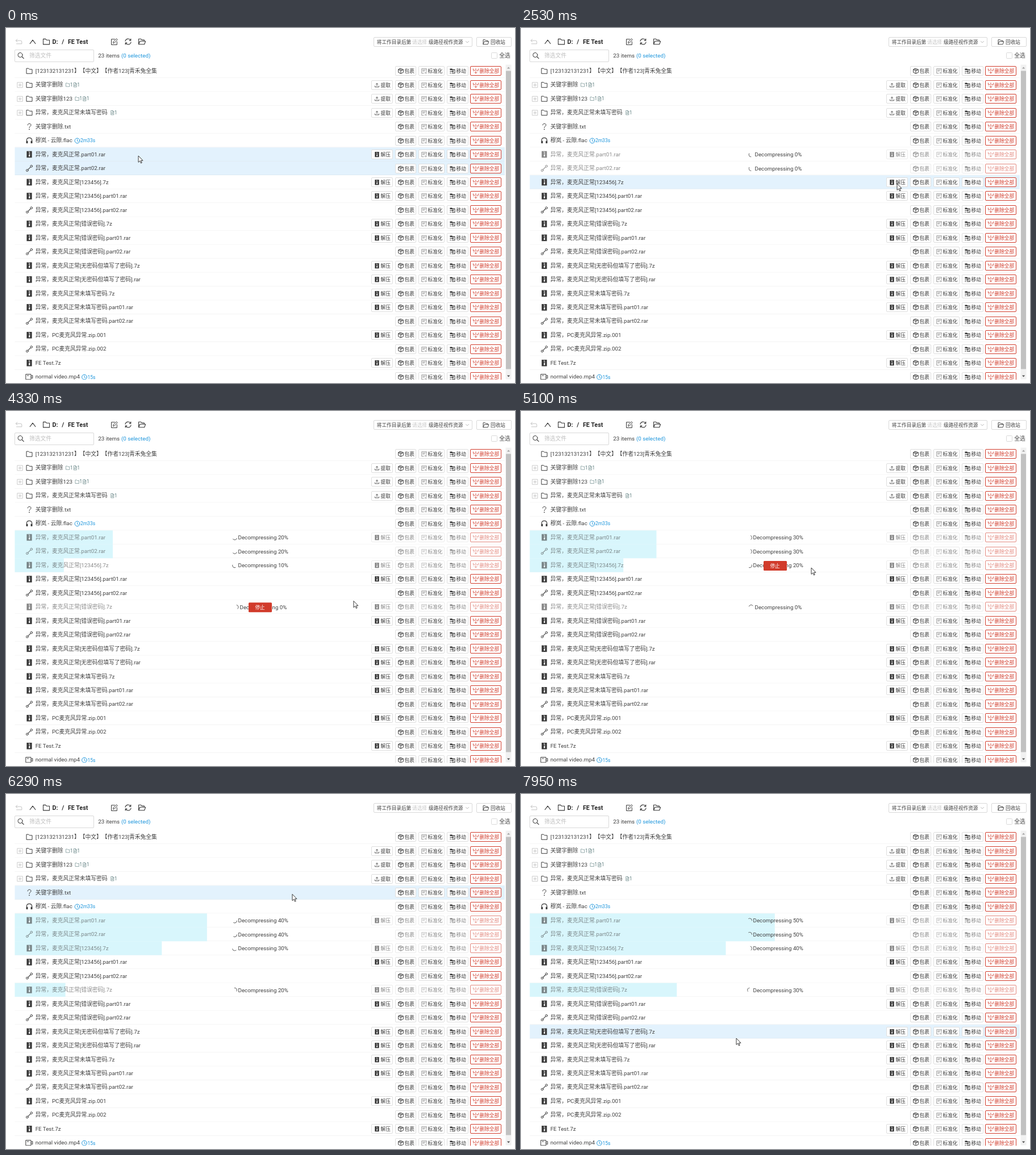
Animation of 896x625 px, one loop 8 s. Source, as an HTML page:

```html
<!DOCTYPE html>
<html lang="zh-CN">
<head>
<meta charset="utf-8">
<title>File list</title>
<style>
html, body { margin: 0; width: 100%; height: 100%; overflow: hidden; background: #fff; }
svg { display: block; width: 896px; height: 625px; }
text {
  font: 9.75px Roboto, "Noto Sans CJK SC", "Noto Sans CJK", sans-serif;
  font-feature-settings: "chws" 0, "halt" 0; text-spacing-trim: space-all;
  fill: #404040; white-space: pre;
}
.btn { font-size: 8.65px; }
.bold { font-size: 10.7px; font-weight: 700; fill: #262626; }
.badge { font-size: 8.5px; }
.line { fill: none; stroke: currentColor; stroke-linecap: round; stroke-linejoin: round; }
</style>
</head>
<body>
<svg id="stage" viewBox="0 0 896 625" xmlns="http://www.w3.org/2000/svg"></svg>
<script>
const LOOP = 8000, STEP = 69.5, TOP = 63.4, ROW = 24.48, LEFT = 15.5, WIDTH = 862.5;
const DARK = '#383838', RED = '#d13b2b', BLUE = '#1e96dc', TEAL = '#5f7f80';

// kind, name, extras
const rows = [
  ['folder', '[123132131231】【中文】【作者123]青禾兔全集'],
  ['folder', '关键字删除', { badge: 105, dirs: 1 }],
  ['folder', '关键字删除123', { badge: 121.5, dirs: 1 }],
  ['folder', '异常，麦克风正常未填写密码', { badge: 183.5 }],
  ['query', '关键字删除.txt'],
  ['audio', '穆岚 - 云隙.flac', { clock: 125.5, length: '2m33s' }],
  ['zip', '异常，麦克风正常.part01.rar'],
  ['part', '异常，麦克风正常.part02.rar'],
  ['zip', '异常，麦克风正常[123456].7z'],
  ['zip', '异常，麦克风正常[123456].part01.rar'],
  ['part', '异常，麦克风正常[123456].part02.rar'],
  ['zip', '异常，麦克风正常[错误密码].7z'],
  ['zip', '异常，麦克风正常[错误密码].part01.rar'],
  ['part', '异常，麦克风正常[错误密码].part02.rar'],
  ['zip', '异常，麦克风正常[无密码但填写了密码].7z'],
  ['zip', '异常，麦克风正常[无密码但填写了密码].rar'],
  ['zip', '异常，麦克风正常未填写密码.7z'],
  ['zip', '异常，麦克风正常未填写密码.part01.rar'],
  ['part', '异常，麦克风正常未填写密码.part02.rar'],
  ['zip', '异常，PC麦克风异常.zip.001'],
  ['part', '异常，PC麦克风异常.zip.002'],
  ['zip', 'FE Test.7z'],
  ['video', 'normal video.mp4', { clock: 138, length: '15s' }],
];
// A split archive is hovered and unpacked together with its first part.
const head = i => rows[i] && rows[i][0] === 'part' ? i - 1 : i;

const jobs = [
  { row: 6, start: 1900, base: 1578, period: 1121, spin: -40 },
  { row: 8, start: 2730, base: 2725, period: 1080, spin: 10 },
  { row: 11, start: 4065, base: 4061, period: 1080, spin: -135 },
];

// time, x, y of the pointer tip
const track = [
  [0, 233, 225], [513, 233, 225], [652, 252, 245], [861, 252, 245],
  [1250, 450, 265], [1690, 671, 225], [1830, 677, 221], [2050, 677, 222],
  [2530, 662, 274], [2740, 660, 275], [3220, 640, 325.5], [3500, 645, 338],
  [3920, 659, 351], [4070, 658, 350], [4330, 612, 334.5], [4560, 575, 318],
  [5100, 511, 276], [5380, 500, 315], [5800, 492, 402], [5930, 492, 402],
  [6290, 504, 176], [6720, 500, 174], [7460, 392, 455], [7620, 388, 450],
  [7950, 379, 430],
];

const clamp = v => Math.max(0, Math.min(1, v));
const smooth = p => p * p * (3 - 2 * p);
const inOut = p => p < .5 ? 4 * p ** 3 : 1 - 4 * (1 - p) ** 3;
const rowTop = i => TOP + ROW * i;

const text = (x, y, s, cls = '', fill = '') =>
  `<text x="${x}" y="${y}" class="${cls}"${fill && ` style="fill:${fill}"`}>${s}</text>`;
const rect = (x, y, w, h, fill, stroke = 'none', r = 0) =>
  `<rect x="${x}" y="${y}" width="${w}" height="${h}" rx="${r}" fill="${fill}" stroke="${stroke}"/>`;
const line = (d, w = 1) => `<path class="line" stroke-width="${w}" d="${d}"/>`;
const solid = d => `<path fill="currentColor" d="${d}"/>`;

// Icons are drawn around 0,0 in a box of about 12 px.
const icons = {
  folder: line('M-5 4.2V-4.5H-1.2L.4-2.8H5V4.2Z'),
  open: line('M-5 4.3V-4.3H-1.3L.2-2.6H4V-.7M-5 4.3L-3-.7H6L4.2 4.3Z'),
  file: line('M-3.5 5V-5H1L3.7-2.2V5ZM1-5V-2.2H3.7M-1.6 0H1.6M-1.6 2.3H1.6'),
  query: line('M-2.8-2.6C-2.8-6.3 3-6.2 3-2.7 3-.4 0-.5 0 2') + '<circle cy="4.8" r=".9" fill="currentColor"/>',
  audio: line('M-4.7 4V0C-4.7-6.2 4.7-6.2 4.7 0V4', 1.1) + solid('M-5.3.7h2.7v4.3h-2.7ZM2.6.7h2.7v4.3h-2.7Z'),
  zip: solid('M-4.6-5.8H4.6V5.8H-4.6Z') +
    '<path d="M-1-5h1.2v1.2H-1ZM.2-3.8h1.2v1.2H.2ZM-1-2.6h1.2v1.2H-1ZM.2-1.4h1.2v1.2H.2ZM-.9.3H1.3V3.7H-.9Z" fill="#fff"/>',
  part: line('M-2.2 2.2L2.2-2.2', 1.1) + '<circle class="line" cx="-3.7" cy="3.7" r="1.8"/><circle class="line" cx="3.7" cy="-3.7" r="1.8"/>',
  video: line('M-5.8-4.6H3V4.6H-5.8ZM3-1.2L5.8-2.6V2.6L3 1.2M-3.7-2.3H-1.3'),
  clock: '<circle class="line" r="4.4"/>' + line('M0-2.4V.3L1.8 1.4', .9),
  plus: line('M-4.5-4.5H4.5V4.5H-4.5Z', .8) + line('M-2.5 0H2.5M0-2.5V2.5', .9),
  upload: line('M-4.3 1.6V4H4.3V1.6M0 1.8V-4M-2-2L0-4.1 2-2'),
  box: line('M0-4.7L4.6-2.6V2.6L0 4.7-4.6 2.6V-2.6ZM-4.6-2.6L0-.4 4.6-2.6M0-.4V4.7M-2.3-3.7L2.3-1.5'),
  norm: line('M-1 4.2H-4.5V-4.2H4.5V-.5M-2.6-1.8H2.6M-2.6.2H.5M1 3.8L4.6 1M2.6 4.4L4.8 3.5', .8),
  move: solid('M-4.8-4.4H-.8L.2-3.2H4.8V-1.6H-4.8Z') + line('M4.3-1V4H-.8M-4.5.8H1.6M.2-.6L1.7.8.2 2.2M-4.5 3.8H-3', 1.1),
  remove: line('M-4.7-4V-1.2H-2M4.7-4V-1.2H2M0-4.4V-1M0 .5V4.2M-1.7 2.5L0 4.3 1.7 2.5M-3.8 1.2h.1M3.8 1.2h.1', .9),
  undo: line('M-2.6-4.2L-5.3-1.8-2.6.6M-5.2-1.8H3.2Q5.3-1.8 5.3.8V3.8H-4'),
  up: line('M-4.8 3L0-3.3 4.8 3', 1.2),
  down: line('M-2.6-1.2L0 1.4 2.6-1.2', .8),
  edit: line('M1-4.8H-5V5H4.8V-.5M-1.8 2L-1.4-.4 4-5.8 5.7-4.1.4 1.5Z'),
  refresh: line('M-5-.8A5.1 5.1 0 0 1 4.5-2.3M5 .8A5.1 5.1 0 0 1-4.5 2.3M4.8-5V-2.1H2M-4.8 5V2.1H-2', 1.1),
  search: '<circle class="line" cx="-1" cy="-1" r="4"/>' + line('M2 2L5.2 5.2', 1.1),
};
const icon = (name, x, y, color = DARK, k = 1) =>
  `<g transform="translate(${x} ${y}) scale(${k})" color="${color}">${icons[name]}</g>`;

// Button frames sit on whole pixels.
function button(x, w, y, name, label, color = DARK, border = '#dedede') {
  const mid = Math.floor(y) + .5, small = name === 'zip' || name === 'upload';
  return rect(x + .5, mid - 8, w - 1, 16, '#fff', border, 1.5) +
    icon(name, x + 10, mid + .2, name === 'norm' ? '#777' : color, small ? .8 : .95) +
    text(x + 16.5, mid + 3.4, label, 'btn', color);
}

function rowBody(i) {
  const [kind, name, more = {}] = rows[i];
  const y = rowTop(i + .5);
  let s = icon(kind, 41, y) + text(51.7, y + 3.2, name);
  if (more.badge) {
    let x = more.badge;
    s += icon('plus', 24.7, y + .2, '#c0c0c0');
    if (more.dirs) {
      s += icon('folder', x + 3.7, y - .2, TEAL, .65) + text(x + 7.8, y + 2.8, '1', 'badge', TEAL);
      x += 13;
    }
    s += icon('file', x + 3.7, y - .2, TEAL, .7) + text(x + 7.2, y + 2.8, '1', 'badge', TEAL);
    s += button(643, 38, y, 'upload', '提取');
  }
  if (more.clock)
    s += icon('clock', more.clock, y + .4, BLUE) + text(more.clock + 5.4, y + 3.4, more.length, 'badge', BLUE);
  if (kind === 'zip') s += button(643, 38, y, 'zip', '解压');
  return s + button(685, 37, y, 'box', '包裹') + button(726, 46, y, 'norm', '标准化') +
    button(776, 38, y, 'move', '移动') + button(817, 55, y, 'remove', '删除全部', RED, RED);
}

function header() {
  return icon('undo', 22.5, 24, '#c4c4c4') + icon('up', 47, 24.5) + icon('folder', 71, 24.3, DARK, 1.1) +
    text(81.5, 27.8, 'D:', 'bold') + text(98.3, 27.8, '/', 'bold') + text(109, 27.8, 'FE Test', 'bold') +
    icon('edit', 190.5, 24.5) + icon('refresh', 215, 24) + icon('open', 239, 24, DARK, 1.1) +
    rect(15.5, 38.5, 139, 21, '#fff', '#d9d9d9', 1.5) + icon('search', 26, 48.5) +
    text(41, 52, '筛选文件', '', '#bfbfbf') + text(162.3, 52, '23 items') +
    text(203, 52, '(0 selected)', '', BLUE) +
    rect(647.5, 16.5, 173, 16, '#fff', '#d9d9d9', 1.5) + text(652.8, 27.6, '将工作目录后第', 'btn') +
    text(715, 27.6, '请选择', 'btn', '#c6c6c6') + text(744, 27.6, '级路径视作资源', 'btn') +
    icon('down', 812, 24.5, '#aaa') +
    rect(828.5, 16.5, 61, 16, '#fff', '#d9d9d9', 1.5) + icon('open', 844.5, 24.5, DARK, .9) +
    text(853, 27.6, '回收站', 'btn') +
    rect(854.5, 43.5, 10, 10, '#fff', '#d9d9d9', 1) + text(868.3, 52, '全选');
}

function scrollbar() {
  return rect(879.5, 64.5, 10, 554, '#f1f1f1') + rect(880, 75.5, 9, 525, '#c1c1c1') +
    '<path d="M882 71.5L884.6 68.5 887.2 71.5Z" fill="#a3a3a3"/><path d="M882 611.5L884.6 614.5 887.2 611.5Z" fill="#505050"/>';
}

const busyView = i => {
  const y = rowTop(i + .5);
  return `<g id="busy${i}" display="none">
    <g id="spin${i}" color="#555">${line('M2-3.4A3.9 3.9 0 0 1 2 3.4', .9)}</g>
    <text id="label${i}" y="${y + 3.6}" text-anchor="end"></text>
    <g id="stop${i}">${rect(427, y - 7.6, 41, 17, RED, 'none', 1.5)}${text(438.4, y + 4.2, '停止', 'btn', '#fff')}</g></g>`;
};

const busyRows = jobs.flatMap(job => rows.map((_, i) => i).filter(i => head(i) === job.row).map(i => ({ i, job })));

const stage = document.getElementById('stage');
stage.innerHTML = `<defs><clipPath id="list"><path d="M0 62H896V619.3H0Z"/></clipPath></defs>
  ${rect(0, 0, 896, 625, '#fff')}${header()}
  <g clip-path="url(#list)">
    ${rows.map((_, i) => `<rect id="bg${i}" x="${LEFT}" y="${rowTop(i)}" width="${WIDTH}" height="${ROW}" fill="#fff"/>` +
      `<rect x="${LEFT}" y="${rowTop(i + 1) - .8}" width="${WIDTH}" height=".8" fill="#000" opacity=".06"/>`).join('')}
    ${busyRows.map(({ i }) => `<rect id="bar${i}" x="${LEFT}" y="${rowTop(i)}" height="${ROW}" fill="#d8f6fc"/>`).join('')}
    ${rows.map((_, i) => `<g id="row${i}">${rowBody(i)}</g>`).join('')}
    ${busyRows.map(({ i }) => busyView(i)).join('')}
  </g>${scrollbar()}
  <path id="pointer" d="M0 0V11.4L2.7 8.9 4.5 13 6.2 12.2 4.5 8.3H8Z" fill="#fff" stroke="#222" stroke-width=".9" stroke-linejoin="round"/>`;

const el = {};
stage.querySelectorAll('[id]').forEach(node => el[node.id] = node);
const set = (id, name, value) => el[id].setAttribute(name, value);
const show = (id, on) => set(id, 'display', on ? 'inline' : 'none');

function pointerAt(t) {
  const k = Math.max(1, track.findIndex(p => p[0] >= t));
  const [a, b] = [track[k - 1], track[k]];
  const p = smooth(clamp((t - a[0]) / (b[0] - a[0])));
  return [a[1] + (b[1] - a[1]) * p, a[2] + (b[2] - a[2]) * p];
}

function render(time) {
  const t = Math.min(7950, Math.max(0, 930 + Math.floor((time - 922) / STEP) * STEP));
  const [x, y] = pointerAt(t);
  const over = Math.floor((y - TOP) / ROW);
  set('pointer', 'transform', `translate(${x} ${y})`);

  rows.forEach((_, i) => {
    const busy = jobs.some(j => j.row === head(i) && t >= j.start);
    set('bg' + i, 'fill', !busy && head(i) === head(over) ? '#e3f2fd' : '#fff');
    set('row' + i, 'opacity', busy ? .6 : 1);
  });

  for (const { i, job } of busyRows) {
    const on = t >= job.start;
    const beats = Math.max(0, (t - job.base) / job.period);
    const n = Math.floor(beats);
    const shown = n ? n - 1 + inOut(clamp((beats - n) * job.period / 300)) : 0;
    set('bar' + i, 'width', on ? WIDTH * shown / 10 : 0);
    show('busy' + i, on);
    show('stop' + i, on && over === i);
    el['label' + i].textContent = `Decompressing ${n * 10}%`;
    set('label' + i, 'x', n ? 497 : 494.5);
    set('spin' + i, 'transform', `translate(${n ? 402.6 : 405.1} ${rowTop(i + .5) + .4}) rotate(${job.spin + t * .36})`);
  }
}

const begin = performance.now();
function tick() {
  render((performance.now() - begin) % LOOP);
  requestAnimationFrame(tick);
}
tick();
</script>
</body>
</html>
```
